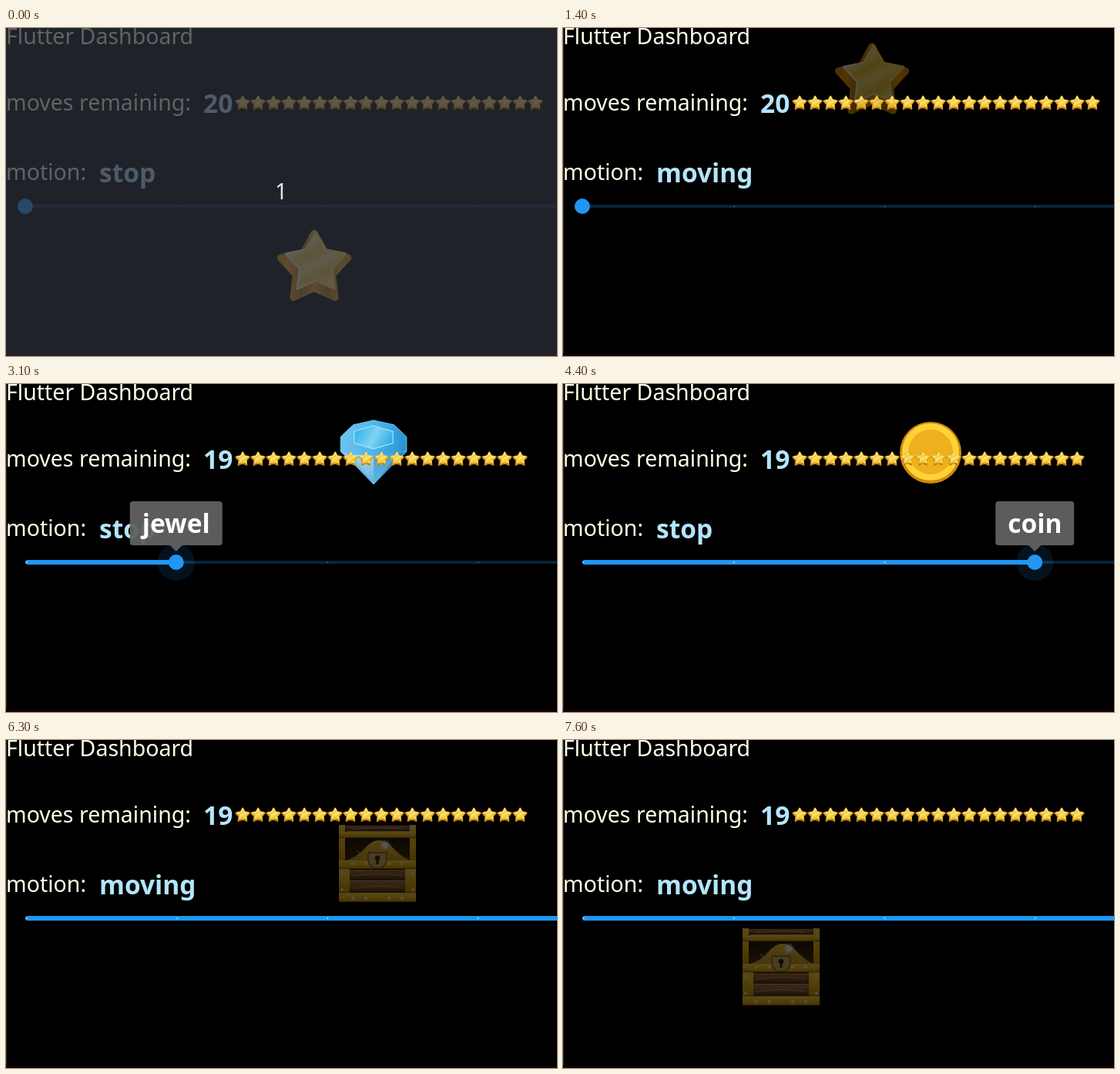
Write an HTML page with a canvas that moves like this. It is 715 px wide and 425 px high and loops after 8000 ms.

```html
<!DOCTYPE html>
<html lang="en">
<head>
<meta charset="utf-8">
<title>Flutter Dashboard</title>
<style>
html, body { margin: 0; width: 100%; height: 100%; overflow: hidden; background: #000; }
canvas { display: block; }
</style>
</head>
<body>
<canvas id="stage" width="715" height="425"></canvas>
<script>
const ctx = document.getElementById('stage').getContext('2d');
const LOOP = 8000, STEP = 100;
const BLUE = '#2196f3', CREAM = '#ffffe6', SKY = '#b3e5fc';
const TRACK_X = 25, TRACK_Y = 231, TRACK_GAP = 195.75;
const LABELS = ['star', 'jewel', 'heart', 'coin', 'treasure'];
const FAMILY = '"Noto Sans", "Open Sans", sans-serif';
const REGULAR = `500 28.5px ${FAMILY}`, BOLD = `600 33.5px ${FAMILY}`;

// Key points of the two drags
const key = (t, x, y) => ({ t, x, y });
const THROW = [
  key(500, 313, 205), key(600, 273, 142), key(800, 274, 72),
  key(1000, 310, 31), key(1400, 351, 17)
];
const CARRY = [
  key(6300, 432, 110), key(6500, 430, 322), key(6900, 419, 338),
  key(7100, 263, 271), key(7400, 223, 257), key(7600, 233, 244)
];
const DROP = 1500, PRESS = 2800, RELEASE = 5400;
const SLIDES = [3000, 3900, 4400, 4900];

const clamp = (v, lo = 0, hi = 1) => Math.min(Math.max(v, lo), hi);
const mix = (a, b, p) => a + (b - a) * p;

function along(keys, t) {
  const i = clamp(keys.findIndex(k => k.t > t), 1, keys.length - 1);
  const next = keys.findIndex(k => k.t > t) < 0 ? keys.length - 1 : i;
  const a = keys[next - 1], b = keys[next];
  const p = clamp((t - a.t) / (b.t - a.t));
  return { x: mix(a.x, b.x, p), y: mix(a.y, b.y, p) };
}

function itemPlace(t) {
  if (t < THROW[0].t) return { x: 350, y: 259 };
  if (t < DROP) return along(THROW, t);
  if (t < CARRY[0].t) return { x: 427, y: 38 };
  return along(CARRY, t);
}

function ring(c, n, cx, cy, rx, ry, dent = 1) {
  c.beginPath();
  for (let i = 0; i < n; i++) {
    const a = i * 2 * Math.PI / n - Math.PI / 2, k = i % 2 ? dent : 1;
    c.lineTo(cx + rx * k * Math.cos(a), cy + ry * k * Math.sin(a));
  }
  c.closePath();
}

function paint(c, fill, stroke, width) {
  c.fillStyle = fill;
  c.fill();
  if (!stroke) return;
  c.strokeStyle = stroke;
  c.lineWidth = width;
  c.stroke();
}

function disc(c, x, y, r, fill) {
  c.beginPath();
  c.arc(x, y, r, 0, 7);
  paint(c, fill);
}

function rect(c, x, y, w, h, fill) {
  c.fillStyle = fill;
  c.fillRect(x, y, w, h);
}

function blend(c, x0, y0, x1, y1, ...colors) {
  const g = c.createLinearGradient(x0, y0, x1, y1);
  colors.forEach((col, i) => g.addColorStop(i / (colors.length - 1), col));
  return g;
}

function star(c) {
  const side = blend(c, 0, 0, 100, 0, '#d88c04', '#f0a414', '#b87400', '#f0aa18', '#b87400', '#f0a414', '#d88c04');
  c.lineJoin = 'round';
  ring(c, 10, 50, 53, 46, 46, .54);
  paint(c, side, side, 9);
  ring(c, 10, 52, 46, 41, 41, .54);
  paint(c,
    blend(c, 25, 10, 70, 90, '#f2d868', '#fff0a0', '#f0cc40', '#fbe47c', '#eec838', '#ffe978', '#f4c42c'),
    blend(c, 20, 50, 62, 44, '#fff6dc', '#ffe25a'), 2.5);
}

function jewel(c) {
  ring(c, 10, 50, 40, 45, 31);
  paint(c, blend(c, 5, 30, 95, 45, '#74c4ee', '#4ab8ea', '#2690d0'), '#62cdf4', 1);
  const shades = ['#8cc8ee', '#b4daf0', '#4a9fd4', '#2578b4'];
  const girdle = a => [50 - 43 * Math.cos(a), 48 + 7 * Math.sin(a)];
  shades.forEach((shade, i) => {
    c.beginPath();
    c.moveTo(50, 92);
    c.lineTo(...girdle(i * Math.PI / 4));
    c.lineTo(...girdle((i + 1) * Math.PI / 4));
    c.closePath();
    paint(c, blend(c, 50, 50, 50, 92, shade, '#58b4e4'), '#6cc0ea', .6);
  });
  ring(c, 6, 50, 31, 29, 15);
  paint(c, blend(c, 28, 20, 72, 44, '#31b5ee', '#7fd3f3', '#28aae5'), '#a4e4f8', 1.2);
}

function heart(c) {
  c.beginPath();
  c.moveTo(50, 90);
  c.bezierCurveTo(-8, 50, 12, 4, 50, 28);
  c.bezierCurveTo(88, 4, 108, 50, 50, 90);
  paint(c, blend(c, 20, 15, 70, 90, '#ff6a5a', '#e8221e', '#a80e12'));
}

function coin(c) {
  disc(c, 50, 51, 40, '#d08a08');
  disc(c, 50, 50, 37, '#ffd338');
  disc(c, 50, 50, 29, '#eeb01c');
}

function plank(c, y, h) {
  rect(c, 0, y, 100, h, blend(c, 0, y, 0, y + h, '#a87a44', '#8a5c2c', '#553314'));
  c.beginPath();
  c.moveTo(18, y + h * .6);
  c.quadraticCurveTo(50, y + h * .2, 82, y + h * .55);
  c.strokeStyle = '#c89a60';
  c.lineWidth = 1;
  c.stroke();
}

function band(c, x, y, w, h) {
  rect(c, x, y, w, h, '#94600a');
  rect(c, x, y, w, h - 1, blend(c, 0, y, 0, y + h, '#ffe050', '#f8c11e', '#d99408'));
}

function chest(c) {
  rect(c, 0, 0, 100, 100, '#2c1a08');
  plank(c, 1, 7);
  rect(c, 10, 8, 82, 1, '#c8b89c');
  for (const x of [0, 92]) band(c, x, 0, 8, 50);
  rect(c, 8, 17, 84, 29, blend(c, 0, 17, 0, 46, '#2a1a0a', '#4c3212'));

  // Heap of gold
  c.beginPath();
  c.moveTo(10, 46);
  c.bezierCurveTo(34, 38, 36, 20, 52, 20);
  c.bezierCurveTo(68, 20, 70, 36, 92, 46);
  paint(c, blend(c, 0, 20, 0, 46, '#f8cf48', '#d89c1c'));
  for (let i = 0; i < 24; i++) disc(c, 24 + i * 29 % 55, 34 + i * 7 % 11, .8, '#ffe27a');

  band(c, 0, 9, 100, 8);
  for (const y of [58, 74]) plank(c, y, 14);
  rect(c, 10, 72, 80, 1.5, '#c8b89c');
  for (const x of [0, 86]) band(c, x, 54, 14, 34);
  band(c, 0, 46, 100, 11);
  band(c, 0, 88, 100, 12);
  for (const x of [18, 35, 65, 82]) for (const y of [50, 95]) disc(c, x, y, 2.2, '#fff0a8');
  for (const x of [4, 96]) for (const y of [62, 84]) disc(c, x, y, 2, '#fff0a8');

  // Lock and glint
  c.beginPath();
  c.roundRect(38, 36, 24, 20, [1, 1, 11, 11]);
  paint(c, '#d9b864', '#86622a', 1.3);
  disc(c, 50, 43, 3.3, '#3a2810');
  rect(c, 48.5, 43, 3, 8, '#3a2810');
  ring(c, 20, 60, 26, 8, 8, .4);
  paint(c, '#fff');
}

function sprite(draw, size) {
  const cv = document.createElement('canvas');
  cv.width = cv.height = size;
  const c = cv.getContext('2d');
  c.scale(size / 100, size / 100);
  draw(c);
  return cv;
}

const items = [star, jewel, heart, coin, chest].map(d => sprite(d, 100));
const moveStar = sprite(star, 20);

function text(str, x, y, font, fill) {
  ctx.font = font;
  ctx.fillStyle = fill;
  ctx.fillText(str, x, y);
}

function label(word, x, scale) {
  ctx.font = BOLD;
  const w = Math.round(ctx.measureText(word).width) + 32;
  const left = clamp(x - w / 2, 8, 825 - w);
  ctx.save();
  ctx.translate(x, 217);
  ctx.scale(scale, scale);
  ctx.translate(-x, -217);
  ctx.beginPath();
  ctx.roundRect(left, 152, w, 57, 4);
  ctx.moveTo(x - 8, 209);
  ctx.lineTo(x, 217);
  ctx.lineTo(x + 8, 209);
  paint(ctx, 'rgba(97,97,97,.95)');
  text(word, left + 16, 193, BOLD, '#fff');
  ctx.restore();
}

function slider(t, value) {
  const x = TRACK_X + TRACK_GAP * value;
  rect(ctx, x, TRACK_Y - 2, 800, 4, '#08243a');
  ctx.beginPath();
  ctx.roundRect(TRACK_X, TRACK_Y - 3, x - TRACK_X, 6, 3);
  paint(ctx, BLUE);
  for (let i = 0; i < 4; i++) {
    const tick = TRACK_X + 1.8 + 195.3 * i;
    disc(ctx, tick, TRACK_Y, 1, tick < x ? 'rgba(255,255,255,.7)' : 'rgba(33,150,243,.54)');
  }
  const held = t < RELEASE;
  if (t >= 2000 && held) disc(ctx, x, TRACK_Y, 24, `rgba(33,150,243,${t < 2600 ? .08 : .12})`);
  disc(ctx, x, TRACK_Y, 10, BLUE);
  if (t >= PRESS && held) label(LABELS[value], x, clamp((t - PRESS + STEP) / (2 * STEP)));
}

function draw(t) {
  const dragged = (t >= THROW[0].t && t < DROP) || t >= CARRY[0].t;
  const moves = t < DROP ? 20 : 19;
  const value = SLIDES.filter(s => s <= t).length;
  const { x, y } = itemPlace(t);
  const item = () => ctx.drawImage(items[value], Math.round(x), Math.round(y));

  rect(ctx, 0, 0, 715, 425, '#000');
  rect(ctx, 0, 0, 1, 421, '#303030');
  rect(ctx, 0, 421, 715, 4, '#0e0203');
  if (!dragged) item();

  text('Flutter Dashboard', 0, 21, REGULAR, CREAM);
  text('moves remaining:', 0, 107, REGULAR, CREAM);
  text('motion:', 0, 197, REGULAR, CREAM);
  text(moves, 256, 110, BOLD, SKY);
  text(dragged ? 'moving' : 'stop', 121, 200, BOLD, SKY);
  for (let i = 0; i < moves; i++) ctx.drawImage(moveStar, 297 + 20 * i, 87);
  slider(t, value);

  if (dragged) {
    ctx.globalAlpha = .33;
    item();
    ctx.globalAlpha = 1;
  }
  if (t < 100) {
    rect(ctx, 0, 0, 715, 425, 'rgba(43,46,56,.75)');
    text('1', 349, 222, REGULAR, '#e4e6e4');
  }
}

function tick(now) {
  const t = now % LOOP;
  draw(t - t % STEP);
  requestAnimationFrame(tick);
}
requestAnimationFrame(tick);
</script>
</body>
</html>
```
